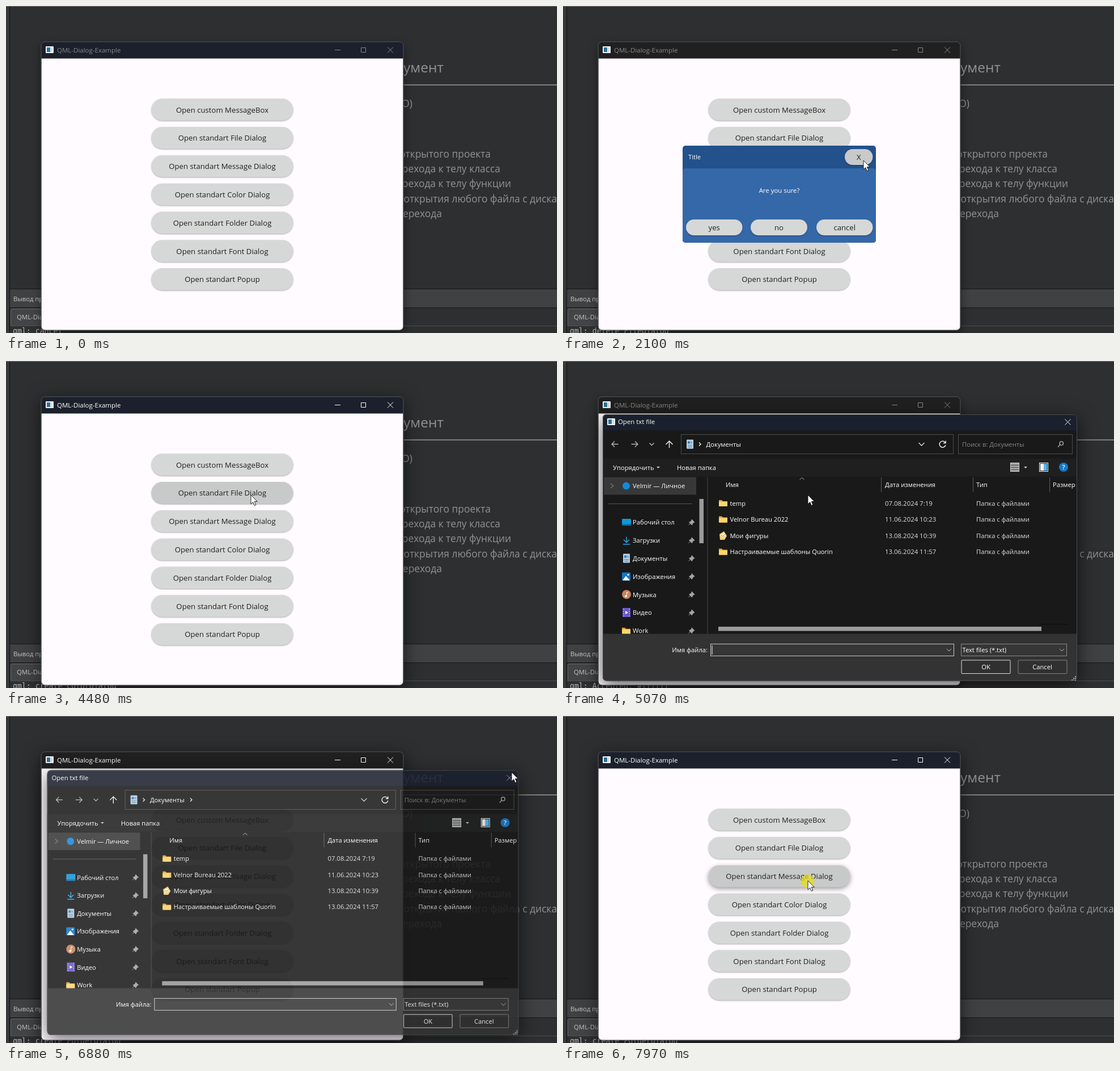
Write an HTML page that moves like this. It is 972 px wide and 576 px high and loops after 8 s.

```html
<!DOCTYPE html>
<html lang="ru">
<head>
<meta charset="utf-8">
<title>QML dialogs</title>
<style>
  html, body { margin: 0; width: 100%; height: 100%; overflow: hidden; background: #2e2f30; }
  svg { display: block; font-family: "Open Sans", "Noto Sans", sans-serif; }
  .mono { font-family: "DejaVu Sans Mono", monospace; }
  .center { text-anchor: middle; }
  .right { text-anchor: end; }
</style>
</head>
<body>
<svg id="stage" width="972" height="576" viewBox="0 0 972 576"></svg>
<script>
const LOOP = 8000;
const stage = document.getElementById('stage');
const $ = id => document.getElementById(id);

// Markup helpers; text is centred vertically on y
const text = (s, x, y, size = 11.2, fill = '#fff', extra = '') =>
  `<text x="${x}" y="${y}" dy=".35em" font-size="${size}" fill="${fill}" ${extra}>${s}</text>`;
const rect = (x, y, w, h, fill, r = 0, extra = '') =>
  `<rect x="${x}" y="${y}" width="${w}" height="${h}" rx="${r}" fill="${fill}" ${extra}/>`;
const line = (d, stroke = '#fff', extra = '') =>
  `<path d="${d}" fill="none" stroke="${stroke}" ${extra}/>`;
const bold = (d, stroke = '#fff', extra = '') => line(d, stroke, `stroke-width="1.3" ${extra}`);
const frame = (x, y, w, h, stroke, fill = 'none', r = 0) =>
  rect(x + .5, y + .5, w - 1, h - 1, fill, r, `stroke="${stroke}"`);
const at = (x, y, body) => `<g transform="translate(${x} ${y})">${body}</g>`;

const buttons = [];
function button(label, x, y, w, h) {
  buttons.push({ x, y, w, h });
  return rect(x, y, w, h, '#d6d8d7', h / 2, `id="button${buttons.length - 1}"`) +
    text(label, x + w / 2, y + h / 2 + .5, 13.2, '#202020', 'class="center"');
}

const appIcon = (x, y) =>
  rect(x, y, 14, 12, '#f0f2f3', 1) + rect(x + 2, y + 2, 6, 8, '#2b7299') +
  rect(x + 9, y + 2, 3, 8, '#d3dade');
const folder = (x, y) => at(x, y,
  '<path d="M0-5h5l2 2h8V6H0z" fill="#e2a93b"/>' + rect(0, -2, 15, 8, '#ffd66e', 1));
const documentIcon = (x, y) => at(x, y, rect(0, -8, 12, 16, '#b4d1e5', 1) +
  rect(2, -5, 4, 4, '#3c78a8') + line('M7-4h3M7-2h3M2 2h8M2 5h8', '#4f7d9f'));

function desktop() {
  const grey = '#929292';
  const copy = [[260.5, 855, 'для открытого проекта'], [286.5, 872, 'для перехода к телу класса'],
    [313, 891, 'для перехода к телу функции'], [339.5, 972, 'для открытия любого файла с диска'],
    [366, 769, 'для перехода']];
  return rect(0, 0, 972, 576, '#2e2f30') + rect(0, 0, 6, 576, '#37383a') +
    line('M6.5 0V576', '#101010') + line('M0 .5H972', '#747576') +
    text('Документ', 772, 108, 24.5, grey, 'class="right"') +
    line('M690 139H972', '#d0d0d0') +
    text('(ПО)', 717, 172, 17.4, grey, 'class="right"') +
    copy.map(([y, x, s]) => text(s, x, y, 17.4, grey, 'class="right"')).join('') +
    rect(7, 499, 965, 33, '#404142') + line('M7 498.5H972M7 531.5H972', '#151515') +
    text('Вывод приложения', 13, 516, 11.2, '#c4c4c4') +
    frame(8, 533, 120, 31, '#68696a', '#434445', 2) +
    line('M7 563.5H972', '#505152') +
    text('QML-Dialog', 19, 548, 11.4, '#c4c4c4') +
    text('', 12, 572, 13.2, '#b5b5b5', 'id="log" class="mono"');
}

function mainWindow() {
  const labels = ['custom MessageBox', 'standart File Dialog', 'standart Message Dialog',
    'standart Color Dialog', 'standart Folder Dialog', 'standart Font Dialog', 'standart Popup'];
  return rect(62, 63, 639.5, 508, '#202020', 7, 'id="mainShadow"') +
    '<path id="titleBar" d="M62 93V70q0-7 7-7H694q7 0 7 7V93z"/>' +
    '<path d="M62.5 92.5H700.5V564q0 7-7 7H69.5q-7 0-7-7z" fill="#fffbff"/>' +
    frame(61.5, 62.5, 640, 509, '#55585c', 'none', 7) +
    appIcon(70, 71) +
    '<g id="titleText">' + text('QML-Dialog-Example', 90, 77.5, 11.5, 'currentColor') +
    line('M580 77.5h10M626.5 73.5h8v8h-8zM673 72.5l10 10m0-10l-10 10', 'currentColor') + '</g>' +
    labels.map((s, i) => button('Open ' + s, 256.5, 163.3 + 49.8 * i, 250, 38.4)).join('');
}

function messageBox() {
  return '<g id="messageBox">' + rect(211, 246, 341, 171, '#22518b', 5) +
    rect(211, 286, 341, 131, '#3568a9', 5) +
    text('Title', 221, 266.5) +
    text('Are you sure?', 381.5, 325, 11.4, '#fff', 'class="center"') +
    button('X', 497, 252, 49.5, 28) + button('yes', 217, 376, 99.5, 28) +
    button('no', 331, 376, 100, 28) + button('cancel', 447, 376, 99.5, 28) + '</g>';
}

function sidebar() {
  const icons = [
    rect(0, -6, 16, 12, '#1597d4', 1) + rect(0, 3, 16, 3, '#0e6fae'),
    line('M8-6V4M3-1l5 5 5-5M2 7h12', '#2ea3e6', 'stroke-width="1.5"'),
    documentIcon(2, 0),
    rect(0, -7, 15, 14, '#0f78d0', 1) +
      '<path d="M1 7l6-8 7 8z" fill="#fff"/><circle cx="11" cy="-3" r="1.5" fill="#fff"/>',
    '<circle cx="8" r="8" fill="#c98458"/><circle cx="7" cy="3" r="2" fill="#fff"/>' + line('M8.5 3V-4l3 1'),
    rect(1, -8, 14, 16, '#6a55c8', 1) + line('M3-7V8M13-7V8', '#c9c0f5', 'stroke-dasharray="2"') +
      '<path d="M6-3l5 3-5 3z" fill="#fff"/>',
    folder(0, 0)];
  const names = ['Рабочий стол', 'Загрузки', 'Документы', 'Изображения', 'Музыка', 'Видео', 'Work'];
  const pin = '<path d="M0-5l5 5-2 .5-2 3-.5 1.5-5-5 1.5-.5 3-2.5zM-2.5 2l-3 3" fill="#a4a4a4" stroke="#a4a4a4"/>';
  return rect(72, 204.5, 163, 31, '#383838') +
    line('M84 216l5 4-5 4', '#999') + '<circle cx="111.5" cy="220" r="6.5" fill="#1489d8"/>' +
    text('Velmir — Личное', 123, 220.5) + line('M80 251.5H228', '#555') +
    names.map((s, i) => {
      const y = 284 + 31.8 * i;
      return at(104, y, icons[i]) + text(s, 123, y + .5) + at(227, y, pin);
    }).join('') +
    rect(240.5, 243, 7.5, 78, '#9b9b9b') + line('M255 204V480', '#303030', 'stroke-width="2"');
}

function fileList() {
  const rows = [['temp', '07.08.2024 7:19'], ['Velnor Bureau 2022', '11.06.2024 10:23'],
    ['Мои фигуры', '13.08.2024 10:39'], ['Настраиваемые шаблоны Quorin', '13.06.2024 11:57']];
  const shapes = at(275, 308, '<path d="M1-3l8-5 5 8-4 7H2z" fill="#f1d17a"/>' +
    '<path d="M3-2l7-3 2 5-7 3z" fill="#fff5cf"/>' + line('M4-1l3 2 4-4', '#9b7640'));
  return text('Имя', 287, 218.5) + text('Дата изменения', 568, 218.5) + text('Тип', 729, 218.5) +
    text('Размер', 864, 218.5) + line('M561.5 205v26M723.5 205v26M858.5 205v26', '#5c5c5c') +
    line('M417.5 209l4-3.5 4 3.5', '#aaa') +
    rect(271, 0, 636, 25, '#4d4d4d', 0, 'id="rowHover"') +
    rows.map(([name, date], i) => {
      const y = 251 + 28.5 * i;
      return (i === 2 ? shapes : folder(275, y - 1)) + text(name, 294.5, y) +
        text(date, 568, y, 11.4, '#dedede') + text('Папка с файлами', 729, y, 11.2, '#dedede');
    }).join('') +
    line('M841 463.5h49', '#0c0c0c') + rect(274, 468, 570, 7.5, '#9c9c9c');
}

function fileDialog() {
  return '<g id="fileDialog">' +
    rect(70, 94, 837, 469.5, '#191919', 7, 'style="filter:drop-shadow(0 8px 16px #000a)"') +
    '<path d="M70 122V101q0-7 7-7H900q7 0 7 7V122z" fill="#1a202e"/>' +
    '<path id="closeHover" d="M868 122V94H900q7 0 7 7V122z" fill="#c42b1c"/>' +
    '<g id="dialogIcon">' + appIcon(78, 101) + '</g>' +
    text('Open txt file', 97, 107.5, 11.4, '#fff', 'id="dialogTitle"') +
    line('M885.5 102.5l10 10m0-10l-10 10', '#fff', 'id="closeMark"') +
    // Navigation row
    bold('M97.5 146.5H86m5-5l-5 5 5 5M120.5 146.5H132m-5-5l5 5-5 5M152.5 144.5l4 4 4-4', '#b8b8b8') +
    bold('M187.5 153V141m-6 6l6-6 6 6') +
    frame(208, 129, 481, 35, '#4d4d4d') + frame(697, 129, 202, 35, '#4d4d4d') +
    documentIcon(218, 146.5) + bold('M240 143.5l3 3-3 3') +
    text('Документы', 252.5, 147) +
    bold('M324 143.5l3 3-3 3', '#fff', 'id="crumb"') +
    bold('M627.5 144l5 5 5-5', '#ddd') +
    bold('M674.5 144a5.5 5.5 0 1 0 .5 4M675 140.5v4h-4') +
    text('Поиск в: Документы', 704, 147, 11.2, '#858585') +
    bold('M882.5 145a3.2 3.2 0 1 1-6.4 0a3.2 3.2 0 1 1 6.4 0M877 147.5l-4 4', '#bbb') +
    // Toolbar
    rect(70, 172, 837, 31.5, '#1f1f1f') +
    text('Упорядочить', 88, 188) + text('Новая папка', 201, 188) +
    '<path d="M165 186h6l-3 3zM813 186h6l-3 3z" fill="#ccc"/>' +
    frame(789, 179, 16, 16, '#d0d0d0', '#a6a6a6') +
    line('M790 183.5h14M790 187.5h14M790 191.5h14', '#444') +
    frame(840, 179, 16, 16, '#fff', '#222') + rect(842, 181, 6, 12, '#f4f4f4') +
    rect(848, 181, 6, 12, '#57b6ee') +
    '<circle cx="883" cy="187" r="8" fill="#1778c8"/>' +
    text('?', 883, 187, 11.4, '#fff', 'class="center" font-weight="600"') +
    sidebar() + fileList() +
    // Footer
    '<path d="M70 480.5H907V556q0 7.5-7 7.5H77q-7 0-7-7.5z" fill="#333"/>' +
    text('Имя файла:', 255, 509.5, 11.2, '#fff', 'class="right"') +
    frame(260, 498, 430, 22, '#c9c9c9', '#363636') + frame(702, 498, 187, 22, '#8b8b8b', '#363636') +
    line('M677 507l4 4 4-4M876 507l4 4 4-4', '#bbb') +
    rect(262.5, 501, 1, 16, '#fff', 0, 'id="caret"') +
    text('Text files (*.txt)', 704.5, 509.5) +
    frame(702.5, 526.5, 87, 24.5, '#e2e2e2', '#303030', 1) +
    frame(802.5, 526.5, 87, 24.5, '#858585', '#303030', 1) +
    text('OK', 746, 539.5, 11.2, '#fff', 'class="center"') +
    text('Cancel', 845.5, 539.5, 11.2, '#fff', 'class="center"') +
    line('M903 556h2M900 559h5M897 562h8', '#aaa', 'stroke-width="2" stroke-dasharray="2 1"') +
    frame(70, 94, 837, 469.5, '#4a4c50', 'none', 7) + '</g>';
}

stage.innerHTML = desktop() + mainWindow() + messageBox() + fileDialog() +
  '<g id="cursor"><circle id="ring" cx="-.5" cy="1" r="12" fill="#e6dc1e" opacity=".75"/>' +
  '<path d="M0 0v16l3.7-3.5 2.6 6 2.6-1.1-2.6-5.9h5z" fill="#fff" stroke="#111" stroke-width=".9"/></g>';

// Pointer way points: time, x, y
const path = [[400, 862, 541], [1160, 470, 186], [1500, 462, 184], [2060, 530, 272], [2200, 530, 272],
  [2860, 460, 384], [2930, 462, 382], [3130, 514, 272], [4000, 514, 272], [4480, 432, 236],
  [5550, 432, 236], [5800, 667, 336], [6330, 892, 99], [6980, 892, 99], [7600, 432, 286], [7830, 432, 290]];
const clicks = [[1230, 1340], [3640, 3720], [4680, 4790], [6750, 6840], [7960, 8000]];
const logs = [[0, 'cancel'], [1300, 'delete FileDialog'], [3670, 'create ColorDialog'],
  [4760, 'Accepted: #ffffff'], [6820, 'create FolderDialog']];

const ramp = (t, a, b) => Math.min(1, Math.max(0, (t - a) / (b - a)));
const within = (t, a, b) => t >= a && t < b;
const show = (id, on) => $(id).setAttribute('visibility', on ? 'inherit' : 'hidden');

function pointer(t) {
  const i = path.findIndex(p => p[0] > t);
  if (i === 0) return path[0].slice(1);
  if (i < 0) return path[path.length - 1].slice(1);
  const [a, b] = [path[i - 1], path[i]];
  const u = ramp(t, a[0], b[0]), k = u * u * (3 - 2 * u);
  return [a[1] + (b[1] - a[1]) * k, a[2] + (b[2] - a[2]) * k];
}

function popup(id, cx, cy, opacity, scale) {
  $(id).setAttribute('opacity', opacity);
  $(id).setAttribute('transform', `translate(${cx} ${cy}) scale(${scale}) translate(${-cx} ${-cy})`);
  show(id, opacity > 0);
}

function draw(t) {
  const [x, y] = pointer(t);
  const pressed = clicks.some(([a, b]) => within(t, a, b));
  const boxIn = ramp(t, 1400, 1550), boxOut = ramp(t, 3670, 3780);
  const fileIn = ramp(t, 4860, 5030), fileOut = ramp(t, 6850, 7080);
  const boxOpen = boxIn > 0 && boxOut < 1, fileOpen = fileIn > 0 && fileOut < 1;

  $('cursor').setAttribute('transform', `translate(${x} ${y})`);
  show('cursor', t >= 400);
  show('ring', pressed);

  const active = within(t, 1230, 1400) || within(t, 3700, 4850) || t >= 6800;
  const tinted = t < 1400 || within(t, 3740, 4880) || t >= 6950;
  $('titleText').setAttribute('color', active ? '#fff' : '#8a8a8a');
  $('titleBar').setAttribute('fill', tinted ? '#1b202c' : '#202020');
  $('mainShadow').style.filter = `drop-shadow(0 6px ${active ? 15 : 8}px #000${active ? 9 : 7})`;
  $('log').textContent = 'qml: ' + logs.filter(l => l[0] <= t).pop()[1];

  buttons.forEach((b, i) => {
    const hover = t >= 400 && !fileOpen && boxOpen === i >= 7 &&
      within(x, b.x, b.x + b.w) && within(y, b.y, b.y + b.h);
    const el = $('button' + i);
    el.setAttribute('fill', hover ? '#c8cac9' : '#d6d8d7');
    el.style.filter = hover && pressed ? 'drop-shadow(0 3px 4px #0006)' : 'drop-shadow(0 1px 1px #0005)';
  });

  popup('messageBox', 381.5, 331.5, boxIn * (1 - boxOut), .95 + .05 * boxIn - .046 * boxOut);
  popup('fileDialog', 488.5, 328.5, fileIn * (1 - fileOut), .95 + .05 * fileIn - .046 * fileOut);

  const closing = fileOut > 0;
  const row = Math.floor((y - 238.5) / 28.5);
  show('rowHover', !closing && within(row, 0, 4) && within(x, 271, 907));
  $('rowHover').setAttribute('y', Math.floor(238 + 28.5 * row));
  show('closeHover', !closing && x > 868 && y < 122);
  show('dialogIcon', !closing);
  $('dialogTitle').setAttribute('x', closing ? 78 : 97);
  $('closeMark').setAttribute('stroke', closing ? '#a0a0a0' : '#fff');
  show('crumb', t >= 5480);
  show('caret', t >= 5000 && (t - 5000) % 980 < 490);
}

const start = performance.now();
function tick() {
  draw((performance.now() - start) % LOOP);
  requestAnimationFrame(tick);
}
tick();
</script>
</body>
</html>
```
